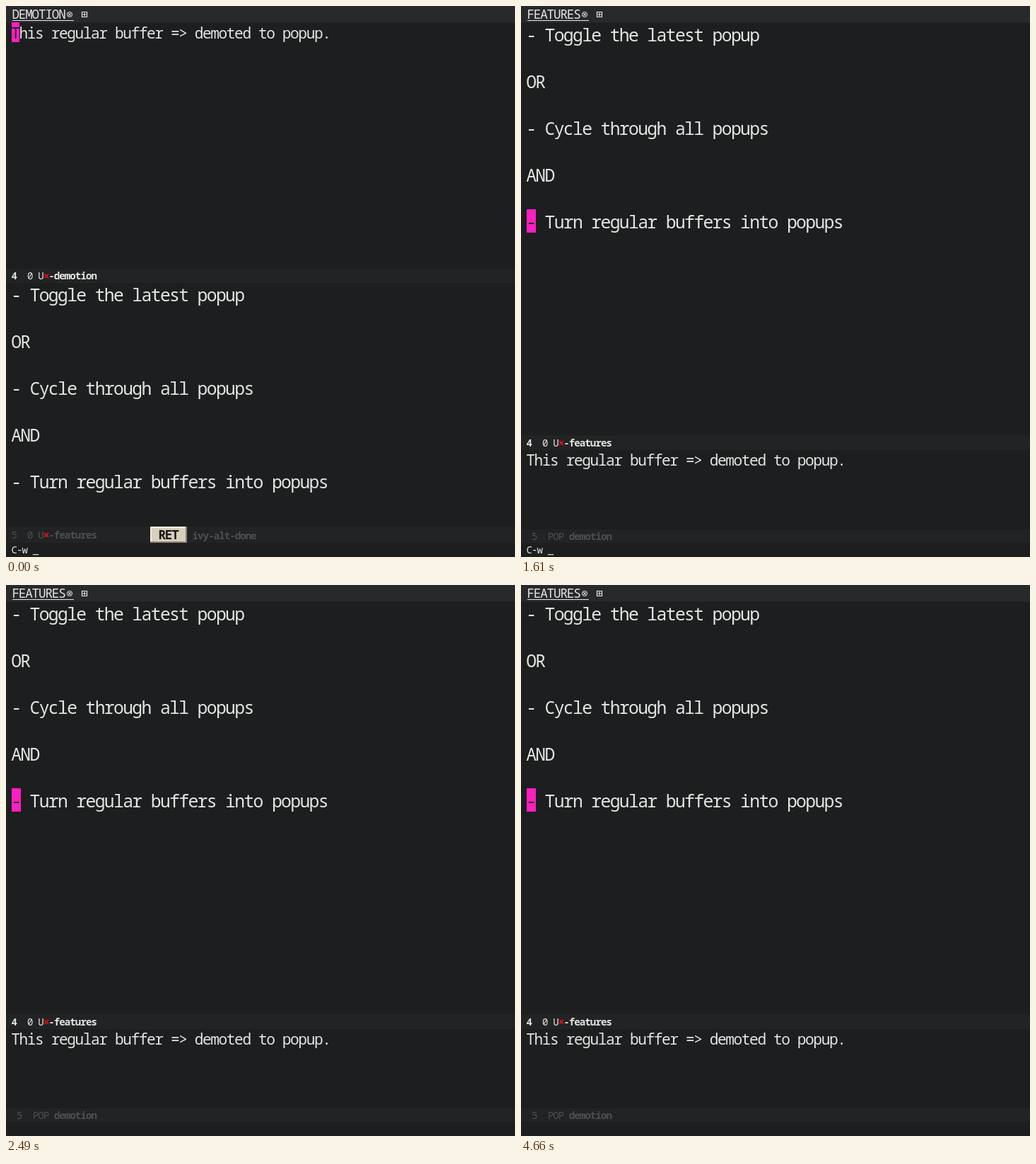
These frames come from a looping animation (720 by 778 pixels, 5350 ms). An HTML page:

```html
<!DOCTYPE html>
<html lang="en">
<meta charset="utf-8">
<title>Popup buffers</title>
<style>
  html, body { margin: 0; height: 100%; overflow: hidden; background: #1c1e1f; }
  svg { display: block; width: 100vw; height: 100vh; }
  text { font-family: "Noto Sans Mono", monospace; white-space: pre; }
</style>
<svg id="stage" viewBox="0 0 720 778"></svg>
<script>
const stage = document.getElementById('stage');
const FG = '#e4e4e2', BG = '#1c1e1f', BAR = '#222324', DIM = '#4e4f50', PINK = '#ff1fc0', RED = '#e01010';
const LARGE = 13.17, MEDIUM = 11.28, TAB = 9.4, SMALL = 7.53;
const LEFT = 8;

const rect = (x, y, w, h, fill) => `<rect x="${x}" y="${y}" width="${w}" height="${h}" fill="${fill}"/>`;
const path = (d, stroke, width = 1) => `<path d="${d}" fill="none" stroke="${stroke}" stroke-width="${width}"/>`;

// Monospace text on a grid of the given cell width
const pen = document.createElement('canvas').getContext('2d');
function text(x, y, cell, str, fill = FG, weight = 500) {
  const size = cell * 1.88;
  pen.font = `${weight} ${size}px "Noto Sans Mono", monospace`;
  const spacing = cell - pen.measureText('0').width;
  return `<text x="${x + spacing / 2}" y="${y}" font-size="${size}" letter-spacing="${spacing}" ` +
    `font-weight="${weight}" fill="${fill}">${str.replace('>', '&gt;')}</text>`;
}

function tabBar(name) {
  return rect(0, 0, 720, 23.5, '#28292b') +
    text(9, 18, TAB, name) + rect(9, 20, 87, 1, FG) +
    `<circle cx="90" cy="12" r="3.6" fill="none" stroke="${FG}"/>` +
    path('M88.2 10.2l3.6 3.6m0-3.6l-3.6 3.6', FG, 1.1) +
    path('M107.5 8.5h7v7h-7zM111 9.5v5m-2.5-2.5h5', FG, 1.2);
}

function line(y, cell, str, cursor) {
  if (!cursor) return text(LEFT, y, cell, str);
  return rect(LEFT, Math.round(y - cell * 2), Math.round(cell), Math.round(cell * 2.5), PINK) +
    text(LEFT, y, cell, str[0], BG) + text(LEFT + cell, y, cell, str.slice(1));
}

const demotion = (top, cursor) => line(top + 22.5, MEDIUM, 'This regular buffer => demoted to popup.', cursor);

const features = (top, cursor) =>
  ['- Toggle the latest popup', 'OR', '- Cycle through all popups', 'AND', '- Turn regular buffers into popups']
    .map((str, i) => line(top + 26 + i * 66, LARGE, str, cursor && i === 4)).join('');

const column = n => LEFT + n * SMALL;

function modeLine(top, height, number, name, active = true) {
  const y = top + height / 2 + 5.3, fill = active ? FG : DIM;
  return rect(0, top, 720, height, BAR) +
    text(column(0), y, SMALL, number, fill, active ? 700 : 500) +
    text(column(3), y, SMALL, '0', fill) + text(column(5), y, SMALL, 'U', fill) +
    path(`M54 ${y - 8}l6 6m0-6l-6 6`, RED, 1.8) +
    text(column(7), y, SMALL, '-' + name, fill, 700);
}

const popupLine = () => rect(0, 739, 720, 19, BAR) +
  text(column(1), 753.5, SMALL, '5', DIM) + text(column(4), 753.5, SMALL, 'POP', DIM) +
  text(column(8), 753.5, SMALL, 'demotion', DIM, 700);

function keyCast(key, command, fill = FG, count = '') {
  return rect(204, 735, 52, 23, '#8b8578') + rect(204, 735, 50, 21, '#f2ecdf') +
    rect(206, 737, 48, 19, '#d8cfbd') +
    text(216, 752.5, TAB, key, '#151515', 700) +
    text(264, 752.5, SMALL, command, fill, 700) + text(264 + 28 * SMALL, 752.5, SMALL, count, fill);
}

const echo = () => text(LEFT, 773, SMALL, 'C-w _');

const demotionScene = () => tabBar('DEMOTION') + demotion(23.5, true) + modeLine(371, 20, '4', 'demotion') +
  features(391, false) + modeLine(735, 23, '5', 'features', false) + keyCast('RET', 'ivy-alt-done', DIM) + echo();

const popupOpen = () => tabBar('FEATURES') + features(23.5, true) + modeLine(606, 21, '4', 'features') +
  demotion(626.5, false) + popupLine();

const popupClosed = count => tabBar('FEATURES') + features(23.5, true) + modeLine(735, 23, '4', 'features') +
  keyCast('C-`', 'popup-buffers-toggle-latest', FG, count);

const LOOP = 5350;
const scenes = [
  [0, demotionScene],
  [1000, () => popupOpen() + echo()],
  [2020, () => popupClosed('')],
  [2490, popupOpen],
  [3130, () => popupClosed('x3')],
  [3630, popupOpen],
];

let shown, start;
function frame(now) {
  start ??= now;
  const t = (now - start) % LOOP;
  const scene = scenes.findLast(([from]) => t >= from);
  if (scene !== shown) {
    shown = scene;
    stage.innerHTML = scene[1]();
  }
  requestAnimationFrame(frame);
}
requestAnimationFrame(frame);
</script>
</html>
```
